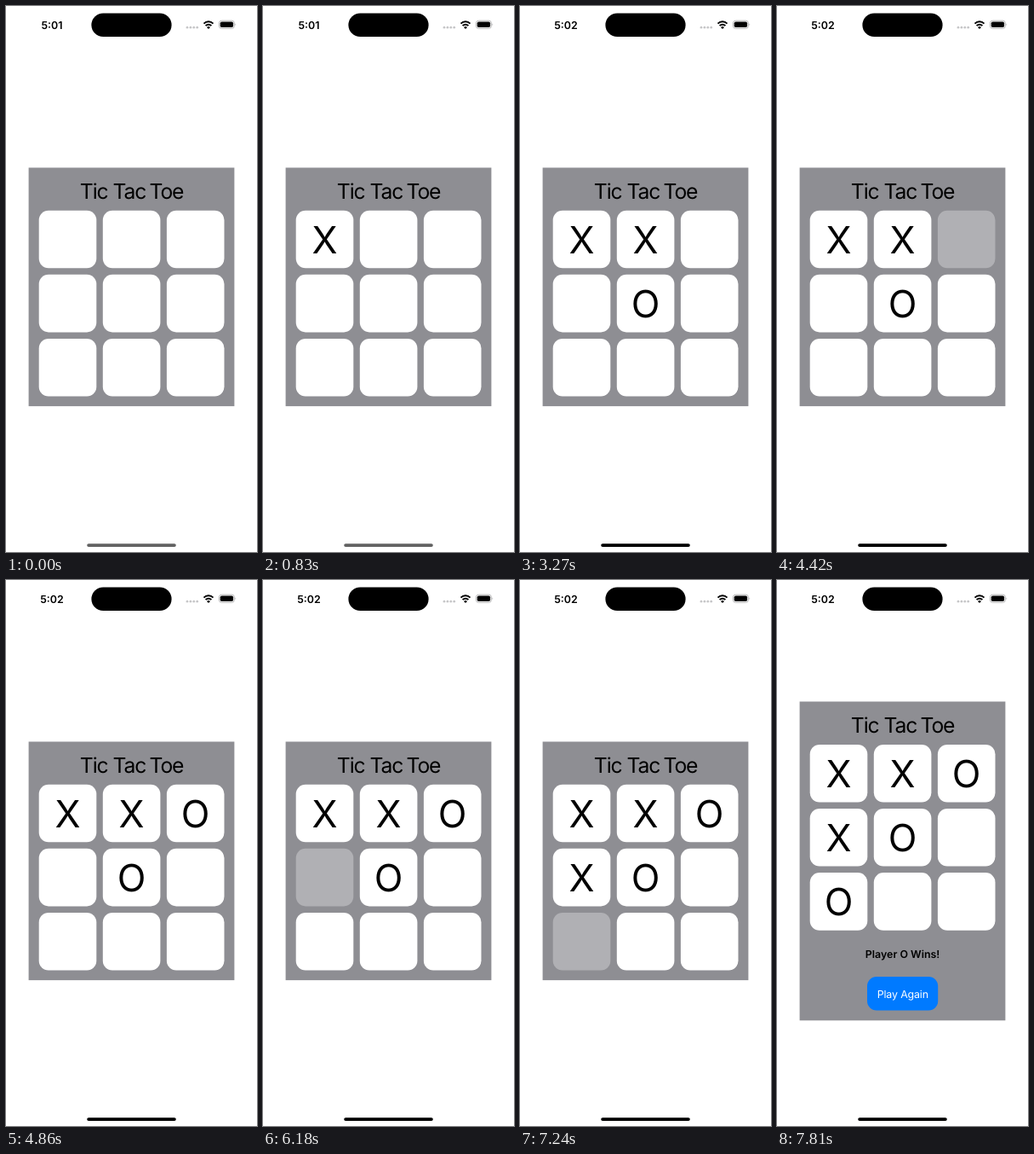
These frames come from a looping animation (295 px wide and 640 px high, 8 s). An HTML page:

```html
<!DOCTYPE html>
<html lang="en">
<head>
<meta charset="utf-8">
<title>Tic Tac Toe</title>
<style>
  html, body { margin: 0; width: 100%; height: 100%; overflow: hidden; background: #fff; }
  svg { display: block; width: 100%; height: 100%; }
  text {
    font-family: Inter, Roboto, "Liberation Sans", sans-serif;
    font-optical-sizing: none;
    text-rendering: geometricPrecision;
  }
  .mid { text-anchor: middle; }
  .title { font-size: 24.7px; letter-spacing: -1.1px; }
  .mark { font-size: 44px; }
  .body { font-size: 12.4px; }
  .bold { font-weight: 600; }
</style>
</head>
<body>
<svg viewBox="0 0 295 640">
  <rect width="295" height="640" fill="#fff"/>

  <text id="clock" class="mid body bold" x="54" y="26.5"></text>
  <rect x="100.4" y="8.4" width="94.2" height="27.7" rx="13.85"/>
  <g id="dots" fill="#c6c6c8"></g>
  <g fill="none" stroke="#000" stroke-width="1.9">
    <path d="M232.5 20.6A7.7 7.7 0 0 1 243.5 20.6"/>
    <path d="M234.6 23.1A4.8 4.8 0 0 1 241.4 23.1"/>
  </g>
  <path d="M238 27L236 24.9A2.9 2.9 0 0 1 240 24.9Z"/>
  <rect x="250.4" y="17.2" width="18" height="9.2" rx="3" fill="none" stroke="#a6a6a8" stroke-width=".8"/>
  <rect x="251.7" y="18.5" width="15.4" height="6.6" rx="1.8"/>
  <path d="M269.5 20.3Q271 21.8 269.5 23.3Z" fill="#a6a6a8"/>

  <rect id="panel" x="26.6" width="241.8" fill="#8e8e93"/>
  <g id="board">
    <text class="title" y="226"><tspan x="86.8">Tic </tspan><tspan x="125.4">Tac </tspan><tspan x="168.5">Toe</tspan></text>
  </g>
  <g id="result">
    <text class="mid body bold" x="147.6" y="442.5">Player O Wins!</text>
    <rect x="106" y="465" width="83.2" height="39.4" rx="11" fill="#007aff"/>
    <text class="mid body" x="147.8" y="489.6" letter-spacing="-.15" fill="#fff">Play Again</text>
  </g>
  <rect id="home" x="95.2" y="630.2" width="104.6" height="3.8" rx="1.9"/>
</svg>
<script>
  const LOOP = 8000;
  const CELL = 67.6, PITCH = 75.1, LEFT = 38.7, TOP = 239.7, LIFT = 46.8;
  const PRESSED = 0.3;

  // Each tap dims its cell, places a mark and fades back in discrete steps.
  const taps = [
    { cell: 0, mark: "X", from: 500, to: 830, steps: 4 },
    { cell: 4, mark: "O", from: 1560, to: 1980, steps: 5 },
    { cell: 1, mark: "X", from: 2760, to: 3270, steps: 6 },
    { cell: 2, mark: "O", from: 4420, to: 4860, steps: 5 },
    { cell: 3, mark: "X", from: 6180, to: 6620, steps: 5 },
    { cell: 6, mark: "O", from: 7240, to: 7670, steps: 5 }
  ];
  const [, second, third] = taps;
  const last = taps[taps.length - 1];

  const byId = id => document.getElementById(id);
  const clock = byId("clock"), panel = byId("panel"), board = byId("board");
  const result = byId("result"), home = byId("home");

  function add(parent, name, attrs) {
    const node = document.createElementNS("http://www.w3.org/2000/svg", name);
    for (const key in attrs) node.setAttribute(key, attrs[key]);
    return parent.appendChild(node);
  }

  for (let i = 0; i < 4; i++) add(byId("dots"), "circle", { cx: 213 + i * 3.9, cy: 25.2, r: 1.35 });

  const cells = Array.from({ length: 9 }, (_, i) => {
    const x = LEFT + (i % 3) * PITCH, y = TOP + Math.floor(i / 3) * PITCH;
    const group = add(board, "g", {});
    add(group, "rect", { x, y, width: CELL, height: CELL, rx: 11.3, fill: "#fff" });
    const label = add(group, "text", { class: "mid mark", x: x + CELL / 2, y: y + CELL / 2 + 16 });
    return { group, label };
  });

  // Stepped progress: -1 before the tap, 0 when pressed, 1 when settled.
  function progress(tap, t) {
    if (t < tap.from) return -1;
    const n = tap.steps - 1;
    return Math.min(n, Math.floor((t - tap.from) / (tap.to - tap.from) * n)) / n;
  }

  const easeOut = p => 1 - (1 - p) ** 2;

  function draw(t) {
    for (const tap of taps) {
      const p = progress(tap, t);
      const { group, label } = cells[tap.cell];
      const fade = p < 0 ? 1 : PRESSED + (1 - PRESSED) * easeOut(p);
      group.setAttribute("opacity", fade);
      label.textContent = p > 0 ? tap.mark : "";
    }

    const won = progress(last, t) > 0;
    panel.setAttribute("y", won ? 142.5 : 189.5);
    panel.setAttribute("height", won ? 373.8 : 279.6);
    board.setAttribute("transform", `translate(0 ${won ? -LIFT : 0})`);
    result.setAttribute("visibility", won ? "visible" : "hidden");

    clock.textContent = progress(third, t) >= 0.5 ? "5:02" : "5:01";
    const shade = Math.round(98 * (1 - Math.max(0, progress(second, t))));
    home.setAttribute("fill", `rgb(${shade},${shade},${shade})`);
  }

  function tick() {
    draw(performance.now() % LOOP);
    requestAnimationFrame(tick);
  }
  tick();
</script>
</body>
</html>
```
